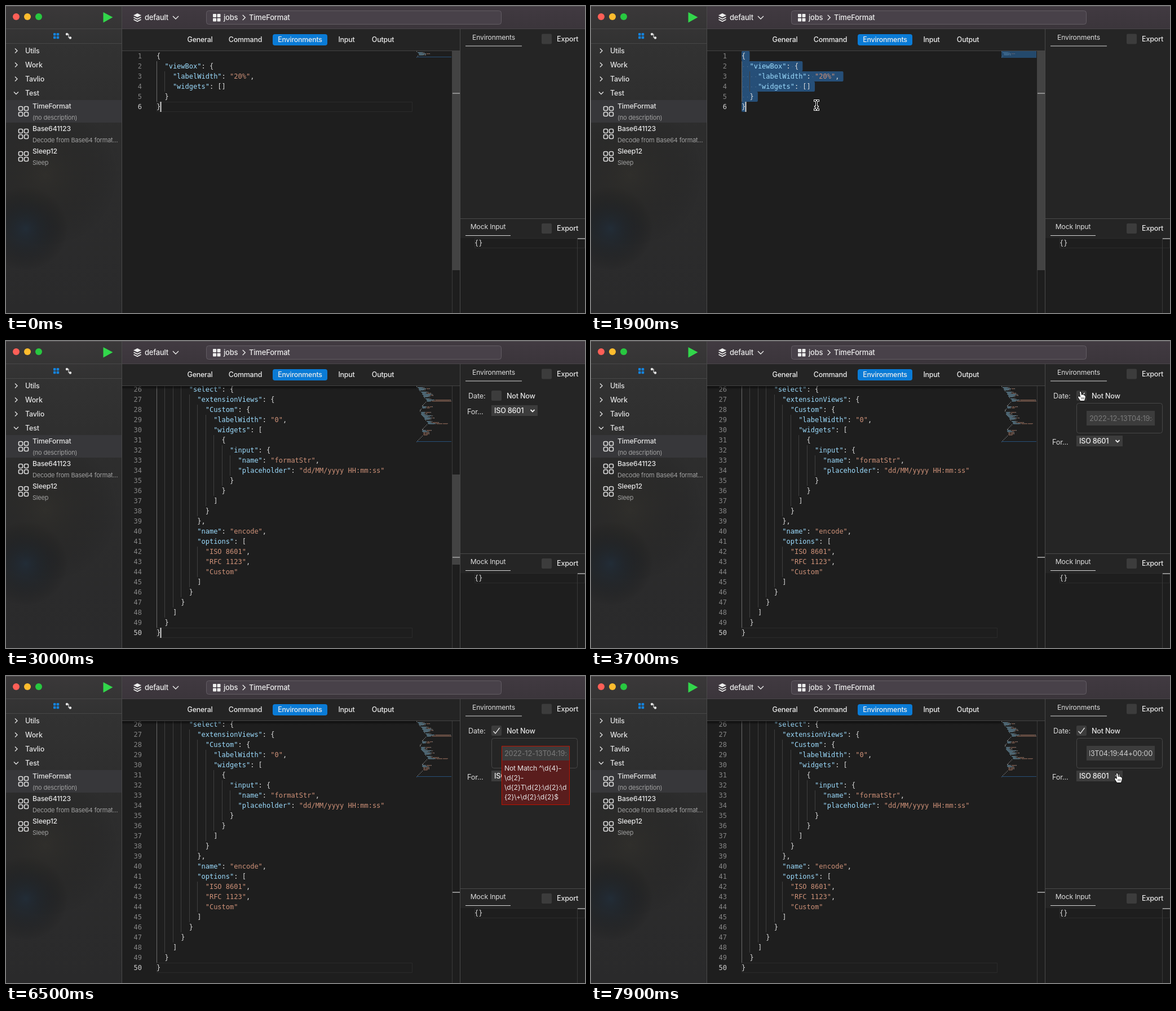
These frames come from a looping animation (1027x545 px, 8 s). An HTML page with a canvas:

```html
<!DOCTYPE html>
<html lang="en">
<head>
<meta charset="utf-8">
<title>Job editor</title>
<style>
html, body { margin: 0; width: 100%; height: 100%; overflow: hidden; background: #1e1e1e; }
canvas { display: block; width: 1027px; height: 545px; }
</style>
</head>
<body>
<canvas id="stage" width="1027" height="545"></canvas>
<script>
const g = document.getElementById('stage').getContext('2d');
const UI = 'Inter, "Open Sans", sans-serif';
const MONO = '12px "DejaVu Sans Mono", monospace';
const CW = 7.224, LH = 18, X0 = 267;
const KEY = '#9cdcfe', STR = '#ce9178', PUNCT = '#dcdcdc';

const shortCode = `{
  "viewBox": {
    "labelWidth": "20%",
    "widgets": []
  }
}`.split('\n');

const longCode = `{
  "viewBox": {
    "labelWidth": "20%",
    "widgets": [
      {
        "optional": {
          "label": "Date",
          "extensionViews": {
            "labelWidth": "0",
            "widgets": [
              {
                "input": {
                  "placeholder": "2022-12-13T04:19:44+00:00",
                  "regex": "^\\\\d{4}-\\\\d{2}-\\\\d{2}T\\\\d{2}:\\\\d{2}$"
                }
              }
            ]
          },
          "label": "Not Now",
          "name": "date"
        }
      },
      {
        "label": "Format",
        "name": "",
        "select": {
          "extensionViews": {
            "Custom": {
              "labelWidth": "0",
              "widgets": [
                {
                  "input": {
                    "name": "formatStr",
                    "placeholder": "dd/MM/yyyy HH:mm:ss"
                  }
                }
              ]
            }
          },
          "name": "encode",
          "options": [
            "ISO 8601",
            "RFC 1123",
            "Custom"
          ]
        }
      }
    ]
  }
}`.split('\n');

function rect(x, y, w, h, fill) {
  g.fillStyle = fill;
  g.fillRect(x, y, w, h);
}

function box(x, y, w, h, r, fill, stroke, lw = 1) {
  g.beginPath();
  g.roundRect(x, y, w, h, r);
  if (fill) { g.fillStyle = fill; g.fill(); }
  if (stroke) { g.strokeStyle = stroke; g.lineWidth = lw; g.stroke(); }
}

function disc(x, y, r, fill) {
  g.beginPath();
  g.arc(x, y, r, 0, 7);
  g.fillStyle = fill;
  g.fill();
}

function line(points, stroke, lw) {
  g.beginPath();
  points.forEach(([x, y]) => g.lineTo(x, y));
  g.strokeStyle = stroke;
  g.lineWidth = lw;
  g.stroke();
}

function poly(points, fill) {
  g.beginPath();
  points.forEach(([x, y]) => g.lineTo(x, y));
  g.closePath();
  g.fillStyle = fill;
  g.fill();
}

// y is the vertical middle of the capitals
function label(s, x, y, size = 12.5, color = '#e4e4e4', weight = 400, align = 'left') {
  g.font = `${weight} ${size}px ${UI}`;
  g.letterSpacing = '-0.2px';
  g.textAlign = align;
  g.fillStyle = color;
  g.fillText(s, x, y + size * 0.36);
  g.letterSpacing = '0px';
}

function mono(s, x, y, color) {
  g.font = MONO;
  g.textAlign = 'left';
  g.fillStyle = color;
  g.fillText(s, x, y);
}

function chevron(x, y, dir, color = '#e0e0e0', s = 4) {
  const p = dir === 'right' ? [[x - s / 2, y - s], [x + s / 2, y], [x - s / 2, y + s]]
                            : [[x - s, y - s / 2], [x, y + s / 2], [x + s, y - s / 2]];
  line(p, color, 1.4);
}

function grid(x, y, size, gap, fill, stroke) {
  for (let i = 0; i < 4; i++) {
    box(x + (i % 2) * (size + gap), y + (i >> 1) * (size + gap), size, size, stroke ? 2 : 1, fill, stroke, 1.6);
  }
}

function glow(x, y, r, color) {
  const p = g.createRadialGradient(x, y, 0, x, y, r);
  p.addColorStop(0, color);
  p.addColorStop(1, 'rgba(0,0,0,0)');
  rect(0, 67, 205, 478, p);
}

function sidebar() {
  const bg = g.createLinearGradient(0, 0, 0, 545);
  bg.addColorStop(0, '#3a3839');
  bg.addColorStop(0.12, '#323232');
  bg.addColorStop(0.4, '#2d2d2d');
  bg.addColorStop(1, '#2a2a2b');
  rect(0, 0, 205, 545, bg);
  glow(35, 395, 75, 'rgba(28,50,72,0.5)');
  glow(70, 300, 130, 'rgba(56,52,40,0.28)');
  rect(0, 40, 205, 1, '#484848');
  rect(0, 66, 205, 1, '#484848');

  ['#ff5f57', '#febc2e', '#28c840'].forEach((c, i) => disc(18 + 20 * i, 19, 6, c));
  poly([[172.5, 11], [189.5, 20], [172.5, 29.5]], '#32d74b');

  grid(84, 48, 4.5, 1.2, '#1583dc');
  line([[108, 50], [111, 50], [111, 56], [114, 56]], '#d8d8d8', 1.2);
  disc(108, 50, 2.2, '#e4e4e4');
  disc(114, 56.5, 2.2, '#e4e4e4');

  ['Utils', 'Work', 'Tavlio', 'Test'].forEach((s, i) => {
    const y = 79.5 + 25 * i;
    chevron(18, y, i < 3 ? 'right' : 'down');
    label(s, 34, y, 12.5, '#e4e4e4', 500);
  });

  rect(0, 167, 205, 40, '#37373a');
  [['TimeFormat', '(no description)'],
   ['Base641123', 'Decode from Base64 format...'],
   ['Sleep12', 'Sleep']].forEach(([name, note], i) => {
    const y = 187 + 40 * i;
    grid(22.5, y - 8.5, 7, 3, null, '#e0e0e0');
    label(name, 47, y - 9, 12.3, '#e4e4e4', 500);
    label(note, 47, y + 11.5, 11, '#a0a0a0');
  });
}

function header() {
  const bg = g.createLinearGradient(0, 0, 0, 40);
  bg.addColorStop(0, '#413a41');
  bg.addColorStop(1, '#3b353b');
  rect(206, 0, 821, 40, bg);
  rect(206, 40, 821, 1, '#4a464a');

  poly([[226, 16.5], [233, 13], [240, 16.5], [233, 20]], '#ececec');
  for (const y of [20, 24]) line([[226.5, y], [233, y + 3.2], [239.5, y]], '#ececec', 1.8);
  label('default', 246, 20.5, 13, '#ececec', 500);
  chevron(301, 20.5, 'down', '#ececec', 5);

  box(355.5, 8.5, 523, 24, 4, '#484149', '#625c63');
  grid(367, 14, 6, 1.5, '#ececec');
  label('jobs', 386, 20.5, 13, '#ececec', 500);
  chevron(422, 20.5, 'right', '#ececec', 4.5);
  label('TimeFormat', 431, 20.5, 13, '#ececec', 500);

  rect(206, 41, 599, 38, '#242424');
  rect(206, 79, 599, 1, '#444');
  box(473, 50, 97, 20, 4, '#0a7bd6');
  [['General', 344], ['Command', 424.5], ['Environments', 521.5], ['Input', 604], ['Output', 668.5]]
    .forEach(([s, x]) => label(s, x, 60, 12.4, '#ececec', 500, 'center'));
}

// Calls put(text, column, color) for each token of a line
function tokens(text, put) {
  const re = /"(?:\\.|[^"])*"|[^\s"]+/g;
  let m;
  while ((m = re.exec(text))) {
    const isKey = text[re.lastIndex] === ':';
    put(m[0], m.index, m[0][0] !== '"' ? PUNCT : isKey ? KEY : STR);
  }
}

function minimap(code, selected) {
  g.save();
  g.beginPath();
  g.rect(728, 80, 62, 465);
  g.clip();
  const h = code.length * 2;
  if (selected) rect(728, 80, 62, h, '#24496c');
  g.globalAlpha = selected ? 0.25 : 0.5;
  code.forEach((text, i) => tokens(text, (s, col, color) => {
    for (let k = 0; k < s.length; k++) {
      if (s[k] !== ' ') rect(728 + col + k, 80 + 2 * i, 1, s[k] === '"' ? 1 : 1.5, color);
    }
  }));
  g.globalAlpha = 1;
  if (!selected) rect(728, 79 + h - 1, 62, 1, '#264f78');
  g.restore();
}

function editor(v) {
  const code = v.pasted ? longCode : shortCode;
  const n = code.length, top = v.pasted ? -373 : 80;
  const first = v.pasted ? 25 : 0;
  const rowY = i => top + LH * i;
  rect(206, 80, 599, 465, '#1e1e1e');
  g.save();
  g.beginPath();
  g.rect(206, 80, 585, 465);
  g.clip();

  if (v.selected) {
    code.forEach((s, i) => {
      const w = (s.length + (i < n - 1 ? 1 : 0)) * CW;
      box(X0, rowY(i), w, LH, 2, '#264f78');
      for (let c = 0; c < s.length; c++) {
        if (s[c] === ' ') rect(X0 + (c + 0.4) * CW, rowY(i) + 9, 1.2, 1.2, '#56718e');
      }
    });
  } else {
    box(X0 + 0.5, rowY(n - 1) + 0.5, 453, LH - 1, 0, null, '#2b2b2b');
  }

  for (let i = first; i < n; i++) {
    const y = rowY(i), depth = code[i].search(/\S/);
    for (let c = 0; c < depth; c += 2) {
      rect(Math.round(X0 + c * CW), y, 1, LH, c ? '#404040' : '#6c6c6c');
    }
    tokens(code[i], (s, col, color) => mono(s, X0 + col * CW, y + 13, color));
    const num = String(i + 1);
    mono(num, 241 - num.length * CW, y + 13, i === n - 1 ? '#d0d0d0' : '#858585');
  }
  if (v.caret) rect(X0 + 6.5, rowY(n - 1), 2, LH, '#d4d4d4');
  minimap(code, v.selected);

  if (v.pasted) {
    const sh = g.createLinearGradient(0, 80, 0, 86);
    sh.addColorStop(0, 'rgba(0,0,0,0.6)');
    sh.addColorStop(1, 'rgba(0,0,0,0)');
    rect(206, 80, 522, 6, sh);
  }
  g.restore();

  rect(791, 80, 1, 465, '#3a3a3a');
  if (v.bar) rect(791, v.pasted ? 237 : 80, 14, v.pasted ? 160 : 389, '#434343');
  rect(792, v.pasted ? 383 : 154, 13, 2, '#8e8e8e');
}

function panelHead(title, cx, y, w) {
  label(title, cx, y, 12.2, '#dcdcdc', 400, 'center');
  rect(815, y + 15, w, 1, '#d8d8d8');
  box(950, y - 6, 18, 18, 2, '#3c3c3c');
  label('Export', 977, y + 2.5, 12.6, '#e4e4e4', 500);
}

function inputBox(v) {
  box(861.5, 110.5, 152, 53, 4, null, '#474747');
  rect(879, 124, 121, 26, '#3c3c3c');
  if (v.error) {
    rect(879, 150, 121, 79, '#5a1d1d');
    box(879.5, 124.5, 120, 104, 0, null, '#be1100');
    ['Not Match ^\\d{4}-', '\\d{2}-', '\\d{2}T\\d{2}:\\d{2}:\\d', '{2}\\+\\d{2}:\\d{2}$']
      .forEach((s, i) => label(s, 884, 163.5 + 17.1 * i, 12.2, '#e4e4e4'));
  }
  g.save();
  g.beginPath();
  g.rect(884, 125, 112, 24);
  g.clip();
  const stamp = '2022-12-13T04:19:44+00:00';
  if (v.value === 'full') label(stamp, 996, 137.5, 12.8, '#cccccc', 400, 'right');
  else if (v.value) label(v.value, 884, 137.5, 12.8, '#cccccc');
  else label(stamp, 884, 137.5, 12.8, '#7a7a7a');
  if (v.inputCaret) rect(v.value ? 889 : 884, 129, 1, 16, '#e0e0e0');
  g.restore();
}

function form(v) {
  label('Date:', 820, 97.5, 12.7, '#dcdcdc');
  box(861, 88, 18, 18, 2, '#3c3c3c');
  if (v.checked) line([[864.5, 98], [868, 102], [875.5, 92]], '#e4e4e4', 1.3);
  label('Not Now', 888, 97, 12.6, '#e4e4e4', 500);
  const y = v.checked ? 178 : 124;
  label('For...', 818, y + 1, 12.7, '#dcdcdc');
  rect(861, y - 10, 82, 19, '#3c3c3c');
  label('ISO 8601', 866, y - 0.5, 12.6, '#f0f0f0', 500);
  line([[930.5, y - 2], [934, y + 1.5], [937.5, y - 2]], '#f0f0f0', 1.8);
  if (v.checked) inputBox(v);
}

function rightPanel(v) {
  rect(806, 41, 221, 504, '#252525');
  rect(805, 41, 1, 504, '#4a4a4a');
  rect(806, 377, 221, 1, '#4a4a4a');
  panelHead('Environments', 865, 55.5, 100);
  panelHead('Mock Input', 855, 392, 80);
  rect(806, 412, 221, 133, '#1e1e1e');
  box(831.5, 412.5, 195, 17, 0, null, '#2b2b2b');
  mono('{}', 831, 425, PUNCT);
  rect(1013, 412, 1, 133, '#3a3a3a');
  rect(1014, 412, 13, 2, '#8e8e8e');
  if (v.pasted) form(v);
}

function beam(x, y) {
  const parts = [[-1, -7, 2, 14], [-4, -9, 3, 2], [1, -9, 3, 2], [-4, 7, 3, 2], [1, 7, 3, 2], [-3, 2, 6, 1.4]];
  for (const [a, b, w, h] of parts) rect(x + a - 1, y + b - 1, w + 2, h + 2, '#f2f2f2');
  for (const [a, b, w, h] of parts) rect(x + a, y + b, w, h, '#111');
}

function shape(x, y, points) {
  const p = points.map(([a, b]) => [x + a, y + b]);
  line([...p, p[0]], '#111', 2);
  poly(p, '#fff');
}

function hand(x, y) {
  g.lineJoin = 'round';
  shape(x, y, [[-3, -8], [-1, -8], [0, -2], [2, -3], [4, -2], [6, -1], [7, 1], [6, 5], [5, 8], [-2, 8], [-6, 2], [-5, 0], [-2, 2]]);
  for (const dx of [0, 2, 4]) line([[x + dx, y + 2], [x + dx, y + 5.5]], '#333', 0.8);
  g.lineJoin = 'miter';
}

function arrow(x, y) {
  shape(x, y, [[0, 0], [0, 15], [3.5, 12], [6, 17], [8, 16], [5.8, 11.2], [10, 11]]);
}

// Pointer legs: time, x, y; each run is visible from its first time to its end
const runs = [
  { end: 2200, pts: [[200, 470, 130], [600, 398, 163], [1100, 400, 176]] },
  { end: 4400, pts: [[3100, 400, 176], [3500, 870, 98], [3700, 870, 98], [4100, 935, 140]] },
  { end: 8000, pts: [[7500, 938, 140], [7900, 935, 181]] }
];

function pointer(t) {
  const run = runs.find(r => t >= r.pts[0][0] && t < r.end);
  if (!run) return;
  const p = run.pts;
  let i = 0;
  while (i < p.length - 2 && t > p[i + 1][0]) i++;
  const [t0, x0, y0] = p[i], [t1, x1, y1] = p[i + 1];
  const u = Math.min(1, (t - t0) / (t1 - t0)), e = u * u * (3 - 2 * u);
  const x = x0 + (x1 - x0) * e, y = y0 + (y1 - y0) * e;
  const inInput = t > 3600 && x > 879 && y > 124 && y < 150;
  const onControl = x > 861 && x < 943 && ((y > 88 && y < 106) || (y > 168 && y < 187));
  if (inInput || (x < 791 && y > 80)) beam(x, y);
  else if (onControl) hand(x, y);
  else arrow(x, y);
}

const within = (t, ...spans) => spans.some(([a, b]) => t >= a && t < b);

function draw(t) {
  const v = {
    pasted: t >= 2200,
    selected: within(t, [1400, 2200]),
    caret: within(t, [0, 100], [600, 1100], [1400, 1600], [1900, 2700], [2900, 3400]),
    bar: t < 3400,
    checked: t >= 3600,
    error: within(t, [4400, 7400]),
    value: t >= 7400 ? 'full' : within(t, [4400, 6100]) ? '1' : '',
    inputCaret: within(t, [4100, 4900], [5400, 5900], [6100, 6500], [6900, 7100])
  };
  sidebar();
  header();
  editor(v);
  rightPanel(v);
  rect(205, 0, 1, 545, '#4a4a4a');
  rect(0, 0, 1027, 1, '#575457');
  pointer(t);
}

function frame() {
  draw(Math.floor((performance.now() % 8000) / 100) * 100);
  requestAnimationFrame(frame);
}
frame();
</script>
</body>
</html>
```
